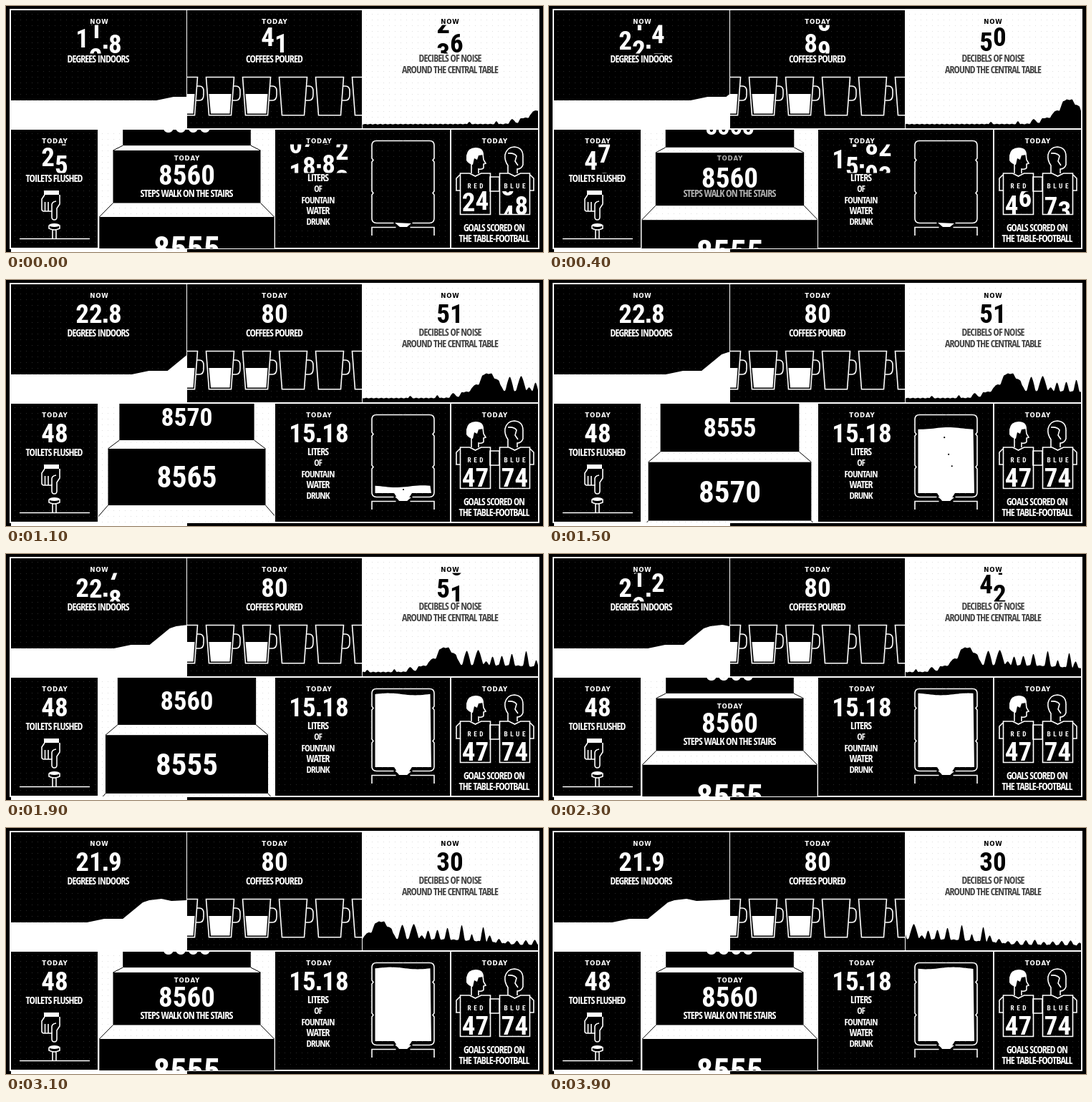
Animation of 750 by 344 pixels, one loop 4000 ms. Source, as an HTML page with a canvas:

```html
<!DOCTYPE html>
<html lang="en">
<head>
<meta charset="utf-8">
<title>Office dashboard</title>
<style>
html, body { margin: 0; width: 100%; height: 100%; overflow: hidden; background: #000; }
canvas { display: block; }
</style>
</head>
<body>
<canvas id="stage" width="750" height="344"></canvas>
<script>
const ctx = document.getElementById('stage').getContext('2d');
const WHITE = '#fff', BLACK = '#000';
const LOOP = 4000, STEP = 100, REEL = 40, SLOT = 18.7;

const clamp = x => Math.max(0, Math.min(1, x));
const lerp = (a, b, p) => a + (b - a) * p;
const sineEase = x => (1 - Math.cos(Math.PI * clamp(x))) / 2;
const cubicEase = x => (x = clamp(x)) < .5 ? 4 * x ** 3 : 1 - 4 * (1 - x) ** 3;
const rollEase = (t, mid) => cubicEase((t - mid) / 1.2 + .5);

function rect(x, y, w, h, color) {
  ctx.fillStyle = color;
  ctx.fillRect(x, y, w, h);
}

function clipped(x, y, w, h, draw) {
  ctx.save();
  ctx.beginPath();
  ctx.rect(x, y, w, h);
  ctx.clip();
  draw();
  ctx.restore();
}

function trace(points, close) {
  ctx.beginPath();
  points.forEach(([x, y]) => ctx.lineTo(x, y));
  if (close) ctx.closePath();
}

function fillShape(points, color = WHITE) {
  trace(points, true);
  ctx.fillStyle = color;
  ctx.fill();
}

function line(points, close = false, color = WHITE, width = 1.6) {
  trace(points, close);
  ctx.strokeStyle = color;
  ctx.lineWidth = width;
  ctx.stroke();
}

function drawPath(d, fill, stroke) {
  const path = new Path2D(d);
  if (fill) { ctx.fillStyle = fill; ctx.fill(path); }
  if (stroke) { ctx.strokeStyle = stroke; ctx.lineWidth = 1.6; ctx.stroke(path); }
}

function panel(x, y, w, h, color, dot) {
  rect(x, y, w, h, color);
  ctx.fillStyle = dot;
  for (let j = y + 5; j < y + h; j += 8)
    for (let i = x + 5; i < x + w; i += 8) ctx.fillRect(i, j, 1, 1);
}

// Text: the font size follows from the wanted line width.
const NARROW = '"Open Sans Condensed", "Roboto Condensed", Roboto';
const SOLID = '"Roboto Condensed", Roboto';
const face = (style, size, family) => `${style} ${size}px ${family}, sans-serif`;
const sizes = new Map();

function sizeFor(text, width, style, family, spacing, max) {
  const key = [text, width, style].join('|');
  if (!sizes.has(key)) {
    ctx.letterSpacing = '0px';
    ctx.font = face(style, 100, family);
    const unit = ctx.measureText(text).width / 100;
    sizes.set(key, Math.min(max, (width - spacing * (text.length - 1)) / unit));
  }
  return sizes.get(key);
}

function write(text, cx, cy, width, style, family, color, spacing, max) {
  const size = sizeFor(text, width, style, family, spacing, max);
  ctx.font = face(style, size, family);
  ctx.letterSpacing = spacing + 'px';
  ctx.textAlign = 'center';
  ctx.fillStyle = color;
  ctx.fillText(text, cx + spacing / 2, cy + size * .356);
  ctx.letterSpacing = '0px';
}

const label = (text, cx, cy, width, color = WHITE) =>
  write(text, cx, cy, width, '300 condensed', NARROW, color, -.9, 16.5);
const heading = (text, cx, cy, color = WHITE) =>
  write(text, cx, cy, text === 'NOW' ? 29 : 39, '700', '"DejaVu Sans"', color, .8, 8.6);

const DIGIT = '700 condensed';
function digitFont() {
  const size = sizeFor('0', SLOT + 1.3, DIGIT, SOLID, 0, 37);
  ctx.font = face(DIGIT, size, SOLID);
  ctx.textAlign = 'center';
  return size * .356;
}

// Each reel travels between the whole parts of its own decimal place.
function counter(cx, cy, from, to, p, count, decimals = 0, color = WHITE) {
  const drop = digitFont();
  const dotWidth = decimals ? 8.5 : 0;
  let x = cx - (count * SLOT + dotWidth) / 2;
  ctx.fillStyle = color;
  clipped(x - 4, cy - REEL / 2, count * SLOT + dotWidth + 8, REEL, () => {
    for (let k = count - 1; k >= 0; k--) {
      const unit = 10 ** k;
      const value = lerp(Math.floor(from / unit), Math.floor(to / unit), p);
      const low = Math.floor(value);
      for (const n of [low, low + 1])
        ctx.fillText(n % 10, x + SLOT / 2, cy + (n - value) * REEL + drop);
      x += SLOT;
      if (decimals && k === decimals) {
        ctx.fillRect(x + 1.5, cy + drop - 5.5, 5.5, 5.5);
        x += dotWidth;
      }
    }
  });
}

function twoStage(t, first, second, mid1, mid2) {
  return t < 1.5 ? [0, first, rollEase(t, mid1)] : [first, second, rollEase(t, mid2)];
}

const HEAT = [[0, 132], [24, 127], [50, 127], [78, 104], [87, 101], [104, 99], [118, 102], [165, 100]];

function temperature(t) {
  panel(7, 6, 245, 165, BLACK, '#2b2b2b');
  heading('NOW', 130, 22);
  counter(129.5, 46.5, ...twoStage(t, 228, 219, -.0068, 2.233), 3, 1);
  label('DEGREES INDOORS', 129, 74, 87);
  clipped(7, 6, 245, 166, () => {
    const x0 = 210 - 31.25 * t;
    fillShape([[0, 132], ...HEAT.map(([u, y]) => [x0 + u, y]), [400, 172], [0, 172]]);
  });
}

function coffee(t) {
  panel(253, 6, 244, 165, BLACK, '#2b2b2b');
  heading('TODAY', 375, 22);
  counter(375, 46.5, 0, 80, rollEase(t, -.0044), 2);
  label('COFFEES POURED', 375, 74, 80);
  clipped(253, 6, 244, 165, () => {
    for (let i = 0; i < 6; i++) {
      const x = 228.5 + 51 * i;
      line([[x, 99.5], [x + 39, 99.5], [x + 35, 152.7], [x + 4, 152.7]], true);
      drawPath(`M${x + 38.5} 112h3q6 0 6 7v5q0 8 -6 8h-4.5`, null, WHITE);
      if (i < 3) fillShape([[x + 4, 123], [x + 35, 123], [x + 33, 150.5], [x + 6.5, 150.5]]);
    }
  });
}

const NOISE = [[-400, 165.5], [-60, 165], [-40, 163], [-36, 157], [-25, 156], [-19, 147], [-12, 146],
  [-7, 133], [-2, 131], [6, 131], [10, 138], [16, 140], [18, 147], [23, 155],
  [100, 156], [150, 159], [190, 163], [400, 165]];
const SPIKES = [[-108, 162, 3], [-70, 161, 3], [-48, 158, 5], [31, 135, 6], [47, 134, 7], [58, 150, 4],
  [67, 143, 4], [80, 142, 4], [94, 139, 4], [114, 135, 4], [128, 148, 3], [144, 138, 4], [153, 150, 4]];
for (let i = 0; i < 11; i++) SPIKES.push([166 + 12.5 * i, 155 + (i * 3 % 4) + i * .25, 4]);

function noiseTop(u) {
  const i = NOISE.findIndex(p => p[0] > u);
  const [u0, y0] = NOISE[i - 1], [u1, y1] = NOISE[i];
  const base = lerp(y0, y1, (u - u0) / (u1 - u0)) + Math.sin(u * .9) * .4;
  return SPIKES.reduce((top, [su, sy, w]) => {
    const d = Math.abs(u - su) / w;
    return d < 1 ? Math.min(top, lerp(sy, base, d ** 1.4)) : top;
  }, base);
}

function noise(t) {
  panel(498, 6, 245, 165, WHITE, '#dedede');
  heading('NOW', 620, 22, BLACK);
  counter(620, 46.5, ...twoStage(t, 51, 30, -.0028, 2.325), 2, 0, BLACK);
  label('DECIBELS OF NOISE', 620.5, 73.5, 88, '#444');
  label('AROUND THE CENTRAL TABLE', 620.5, 89, 135, '#444');
  const peak = 755 - 75 * t;
  const outline = [[498, 171]];
  for (let x = 498; x <= 743; x++) outline.push([x, noiseTop(x - peak)]);
  outline.push([743, 171]);
  fillShape(outline, BLACK);
}

function toilets(t) {
  panel(7, 173, 121, 165, BLACK, '#2b2b2b');
  heading('TODAY', 68, 188.5);
  counter(68, 213.5, 0, 48, rollEase(t, -.0067), 2);
  label('TOILETS FLUSHED', 67.5, 240.5, 80);
  rect(53, 258, 21, 6, WHITE);
  drawPath('M54 264L50 270V284Q50 287 53 287H64V295Q64 299 67.5 299Q71 299 71 295V283L75 277V264', BLACK, WHITE);
  drawPath('M54.5 274V287M59 274V287M64 287V278Q64 274 70 273', null, WHITE);
  drawPath('M60 306.5V311Q67.5 315 75 311V306.5M65 313V325M70 313V325', null, WHITE);
  ctx.beginPath();
  ctx.ellipse(67.5, 306.5, 7.5, 2.6, 0, 0, 7);
  ctx.fillStyle = WHITE;
  ctx.fill();
  line([[19, 325.5], [117, 325.5]]);
}

const STEPS = [8560, 8565, 8570, 8555];
function stepBox(q) {
  const top = 202 + 79.7 * q + 13.3 * q * q;
  const half = 103 + .206 * (top - 202);
  return { top, half, bottom: top + 73.5 + 14 * q };
}

function stairs(t) {
  const mid = 252.5;
  panel(129, 173, 246, 166, WHITE, '#dedede');
  clipped(129, 173, 246, 166, () => {
    const scroll = 4 * sineEase((t - .27) / 2.06);
    const first = Math.floor(scroll) - 2;
    const still = clamp(1 - 8 * Math.min(scroll, 4 - scroll));
    for (let k = first; k < first + 5; k++) {
      const q = scroll - k;
      const { top, half, bottom } = stepBox(q);
      const next = stepBox(q + 1);
      rect(mid - half, top, half * 2, bottom - top, BLACK);
      for (const side of [-1, 1])
        line([[mid + side * half, bottom], [mid + side * next.half, next.top]], false, BLACK, 1);
      const resting = Math.abs(q) < .2 ? still : 0;
      const cy = (top + bottom) / 2 - 2.5 * resting;
      ctx.save();
      ctx.translate(mid, cy);
      const zoom = half * .765 / (SLOT * 4);
      ctx.scale(zoom, zoom);
      const drop = digitFont();
      ctx.fillStyle = WHITE;
      [...String(STEPS[(k + 8) % 4])].forEach((d, i) => ctx.fillText(d, (i - 1.5) * SLOT, drop));
      ctx.restore();
      if (resting) {
        ctx.globalAlpha = resting;
        heading('TODAY', mid, 213);
        label('STEPS WALK ON THE STAIRS', mid, 261.5, 130);
        ctx.globalAlpha = 1;
      }
    }
  });
}

function water(t) {
  panel(376, 173, 244, 165, BLACK, '#2b2b2b');
  heading('TODAY', 437, 188.5);
  counter(437, 213.5, 0, 1518, rollEase(t, -.0062), 4, 2);
  ['LITERS', 'OF', 'FOUNTAIN', 'WATER', 'DRUNK'].forEach((word, i) =>
    label(word, 436, 240.5 + 15.3 * i, [30, 11.5, 47, 33, 33][i]));

  // Bottle, with small ridges on both sides
  for (const side of [-1, 1]) {
    ctx.save();
    ctx.translate(554.5, 0);
    ctx.scale(side, 1);
    drawPath('M0 188.5H37Q43.5 188.5 43.5 195V213L41.5 215.5L43.5 218V259L41.5 261.5L43.5 264V297Q43.5 303.5 37 303.5H13', null, WHITE);
    drawPath('M10 309.5H43.5V321', null, WHITE);
    ctx.restore();
  }
  fillShape([[543, 303], [566, 304], [560, 309], [550, 309]]);

  const fill = sineEase((t - .95) / .7);
  if (fill > .005) {
    const level = 300 - 104 * fill;
    const surface = [];
    for (let x = 515.5; x <= 594; x += 3.5)
      surface.push([x, Math.min(298, level + 1.4 * Math.sin((x - 516) / 12 + t * 5))]);
    fillShape([...surface, [594, 298], [567, 298], [560, 309], [549, 309], [542, 298], [515.5, 298]]);
    for (const [x, delay] of [[555, 0], [560, .13], [564, .22]]) {
      const age = t - 1.1 - delay, y = 293 - 182 * age;
      if (age >= 0 && y > level + 3) {
        ctx.beginPath();
        ctx.arc(x - 7 * age, y, 1.1, 0, 7);
        ctx.fillStyle = BLACK;
        ctx.fill();
      }
    }
  }
}

function jersey(cx, name) {
  line([[cx - 21, 234], [cx - 8, 234], [cx, 238], [cx + 8, 234], [cx + 21, 234], [cx + 21, 291.5], [cx - 21, 291.5]], true);
  write(name, cx, 251.5, name.length * 8 - 2, DIGIT, SOLID, WHITE, 3.5, 13);
}

function football(t) {
  panel(622, 173, 121, 165, BLACK, '#2b2b2b');
  heading('TODAY', 682.5, 188.5);
  drawPath('M650 218V234M666 207L667 215L670 220L667 221V226Q666 229 660 228V234', null, WHITE);
  drawPath('M643 216V209Q645 198 656 198Q667 198 667 208L660 209L658 215L654 213L652 222Q646 221 643 216Z', WHITE);
  drawPath('M701 234V223Q696 216 697 208Q700 197 710 197Q722 198 722 210V222Q720 228 714 228V234', BLACK, WHITE);
  drawPath('M701 206Q710 205 713 210L711 217L715 223', null, WHITE);
  line([[676, 239], [689, 239], [689, 259], [676, 259]], true);
  line([[634, 236], [629, 241], [629, 258], [634, 258]]);
  line([[732, 236], [737, 241], [737, 258], [732, 258]]);
  jersey(655.5, 'RED');
  jersey(710.5, 'BLUE');
  const p = rollEase(t, -.005);
  clipped(622, 259, 121, 32, () => {
    counter(655.5, 275.5, 0, 47, p, 2);
    counter(710.5, 275.5, 0, 74, p, 2);
  });
  label('GOALS SCORED ON', 682, 310, 86);
  label('THE TABLE-FOOTBALL', 682, 324.5, 99);
}

const scenes = [temperature, coffee, noise, toilets, stairs, water, football];

// The display refreshes ten times a second.
function frame(now) {
  const t = Math.floor((now + 5) / STEP) * STEP % LOOP / 1000;
  rect(0, 0, 750, 344, BLACK);
  rect(5, 4, 740, 336, WHITE);
  rect(7, 340, 246, 4, WHITE);
  scenes.forEach(scene => scene(t));
  requestAnimationFrame(() => frame(performance.now()));
}
frame(performance.now());
</script>
</body>
</html>
```
